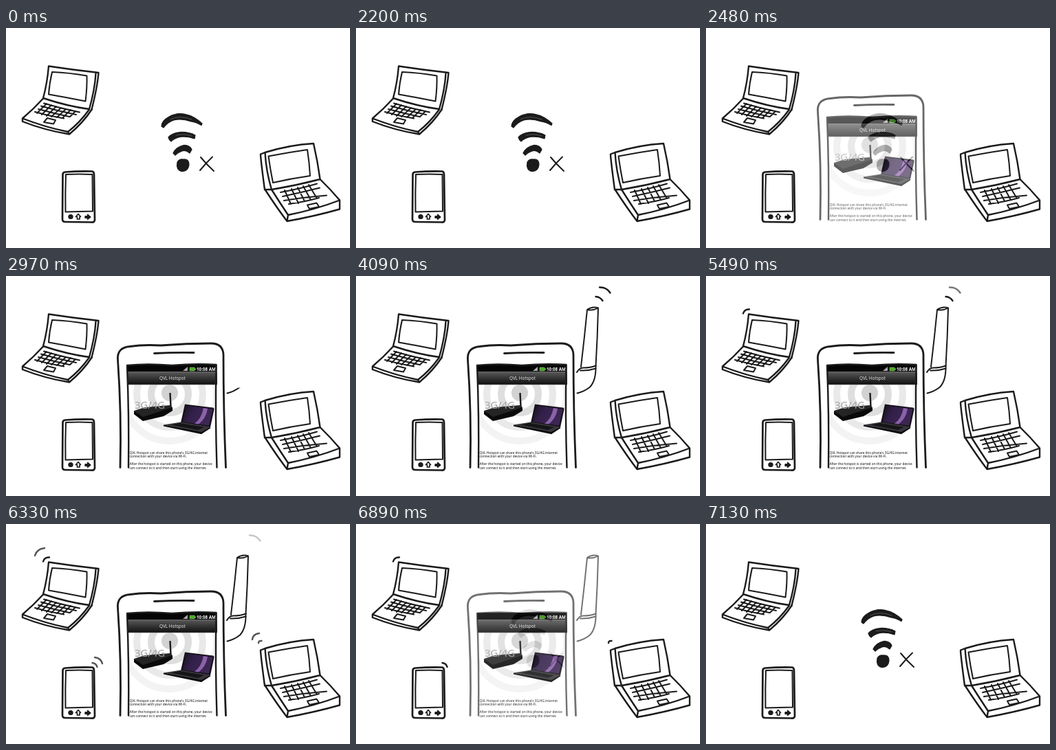
An HTML page that plays this animation: 500 px wide and 320 px high, repeating every 7.21 s.

```html
<!DOCTYPE html>
<html lang="en">
<head>
<meta charset="utf-8">
<title>Phone hotspot</title>
<style>
html, body { margin: 0; width: 100%; height: 100%; overflow: hidden; background: #fff; }
svg { display: block; width: 500px; height: 320px; }
text { font-family: "Noto Sans", "Open Sans", sans-serif; stroke: none; }
.ink { fill: none; stroke: #1b1b1b; stroke-width: 2.4; stroke-linecap: round; stroke-linejoin: round; }
.thin { stroke-width: 2; }
.solid { fill: #1b1b1b; }
.copy { font-size: 4.75px; fill: #111; }

/* One loop is 7210 ms; most changes advance in 70 ms steps. */
.scene, .outline, .echo, .wipe, .wave { animation: 7.21s linear infinite; }
.scene { animation-name: scene; }
.outline { animation-name: outline; }
.echo { animation-name: echo; animation-timing-function: step-end; }
.wipe { animation-name: wipe; }
.mast-in { animation-name: mast-in; }
.mast-out { animation-name: mast-out; }
.left-in { animation-name: left-in; }
.near { animation-name: near; }
.far { animation-name: far; }

@keyframes scene {
  0% { opacity: 0; }
  30.51% { opacity: 0; animation-timing-function: steps(7, jump-none); }
  37.3% { opacity: 1; animation-timing-function: step-end; }
  95.55% { opacity: .88; animation-timing-function: step-end; }
  96.66% { opacity: .6; animation-timing-function: step-end; }
  97.77% { opacity: .25; animation-timing-function: step-end; }
  98.88%, 100% { opacity: 0; }
}
@keyframes outline {
  0% { opacity: 1; animation-timing-function: step-end; }
  95.55%, 100% { opacity: .7; }
}
@keyframes echo {
  0% { opacity: 1; }
  96.66% { opacity: .5; }
  97.77%, 100% { opacity: 0; }
}
@keyframes wipe {
  0% { transform: translateY(134px); }
  41.19% { transform: translateY(134px); animation-timing-function: steps(10, start); }
  50.9%, 100% { transform: none; }
}
@keyframes mast-in {
  0% { opacity: 0; }
  52.84% { opacity: 0; animation-timing-function: steps(4, start); }
  56.72% { opacity: 1; }
  63.52% { opacity: 1; animation-timing-function: steps(4, start); }
  67.4% { opacity: 0; }
  74.2% { opacity: 0; animation-timing-function: steps(2, start); }
  76.14% { opacity: 1; }
  83.91% { opacity: 1; animation-timing-function: steps(4, start); }
  87.79%, 100% { opacity: 0; }
}
@keyframes mast-out {
  0% { opacity: 0; }
  53.81% { opacity: 0; animation-timing-function: steps(4, start); }
  57.69% { opacity: 1; }
  65.46% { opacity: 1; animation-timing-function: steps(4, start); }
  69.34% { opacity: 0; }
  74.2% { opacity: 0; animation-timing-function: steps(5, start); }
  79.05% { opacity: 1; }
  85.85% { opacity: 1; animation-timing-function: steps(4, start); }
  89.73%, 100% { opacity: 0; }
}
@keyframes left-in {
  0% { opacity: 0; }
  63.52% { opacity: 0; animation-timing-function: steps(4, start); }
  67.4% { opacity: 1; }
  77.11% { opacity: 1; animation-timing-function: steps(4, start); }
  80.99% { opacity: 0; }
  83.91% { opacity: 0; animation-timing-function: steps(4, start); }
  87.79%, 100% { opacity: 1; }
}
@keyframes near {
  0% { opacity: 0; }
  63.52% { opacity: 0; animation-timing-function: steps(4, start); }
  67.4% { opacity: 1; }
  74.2% { opacity: 1; animation-timing-function: steps(2, start); }
  76.14% { opacity: 0; }
  85.85% { opacity: 0; animation-timing-function: steps(4, start); }
  89.73%, 100% { opacity: 1; }
}
@keyframes far {
  0% { opacity: 0; }
  65.46% { opacity: 0; animation-timing-function: steps(4, start); }
  69.34% { opacity: 1; }
  74.2% { opacity: 1; animation-timing-function: steps(2, start); }
  76.14% { opacity: 0; }
  85.85% { opacity: 0; animation-timing-function: steps(4, start); }
  89.73% { opacity: 1; animation-timing-function: steps(4, start); }
  93.61%, 100% { opacity: 0; }
}
</style>
</head>
<body>
<svg viewBox="0 0 500 320">
  <defs>
    <linearGradient id="bar" x2="0" y2="1">
      <stop stop-color="#5c5c5c"/><stop offset=".5" stop-color="#343434"/><stop offset="1" stop-color="#101010"/>
    </linearGradient>
    <linearGradient id="lid" x2="1" y2=".4">
      <stop stop-color="#151119"/><stop offset=".4" stop-color="#33204a"/><stop offset="1" stop-color="#3d2754"/>
    </linearGradient>
    <clipPath id="page"><rect x="178" y="158" width="129" height="125"/></clipPath>
    <clipPath id="grow"><rect class="wipe" x="318" y="42" width="40" height="134"/></clipPath>
  </defs>
  <rect width="500" height="320" fill="#fff"/>

  <!-- left laptop -->
  <g class="ink">
    <path d="M54 102Q60 80 62 55.500Q98 61 134.500 65Q133 85 124.500 118.500M54 102Q90 114 121 118Q129 90 130.500 66.500"/>
    <path class="thin" d="M67 64Q92 65 117.500 69.500Q118 87 115.500 106.500Q88 101 62 96.500Q63 81 67 64Z"/>
    <path d="M54 102.500Q40 118 24 131.500Q56 144 90 151Q107 138 121 118.500M24 132V136Q57 149 92 154.500Q112 138 125 118M90 151L92 154.500"/>
    <path class="thin" d="M55 109.500Q80 117 107 122.500M51 113.500Q76 121 102 126M47 118Q69 124 92 129M42 122Q62 128 84 131.500M59 110L45 124M66 112L52 126M73 114L59 128M80 116L66 129M87 118L74 130M94 119L82 131M101 121L93 129"/>
    <path class="thin" d="M60 131L72 134L69 139.500L55 137Z"/>
  </g>

  <!-- small phone -->
  <g class="ink">
    <path d="M86 209.500Q106 208 125 208.500Q128 209 128 213L129 279Q129 283 124 282.500L86 282Q82 282 82 278L82.500 213Q82.500 210 86 209.500Z" stroke-width="2.700"/>
    <path class="thin" d="M87 213Q106 212 125.500 213L126 266.500Q105 267 86.500 267.500Q86 240 87 213Z"/>
    <ellipse class="solid" cx="94" cy="274.500" rx="3" ry="2.800" stroke-width="1.400"/>
    <path d="M101.500 274.500L105 270.500L108.500 274.500H107V278H103.500V274.500Z" stroke-width="1.700"/>
    <path class="solid" d="M115 273.500H118.500V271L123 275L118.500 278.500V276.500H115Z" stroke-width="1.200"/>
  </g>

  <!-- right laptop -->
  <g class="ink">
    <path d="M376.500 181Q412 170 447 168Q453 194 456.500 220Q422 229 386 235Q378 208 376.500 181ZM376.500 181L370 183.500Q370 190 376 235"/>
    <path d="M381.500 186.500Q410 181 438 177Q441 196 442 215Q414 219 388 225Q384 205 381.500 186.500Z" class="thin"/>
    <path d="M386 235H376.500Q394 262 408.500 281Q448 274 485 263.500V250.500Q472 235 456.500 220M386 235Q398 254 410 272Q450 264 485 250.500M410 272L408.500 281"/>
    <path class="thin" d="M399 239Q427 234 452 226.500M402 245Q430 239 456 232.500M404 251Q434 246 466 243.500M411 256Q434 253 455 247M405 236L414 256M415 234L425 255M424 232L434 252M432 230L443 250M440 228L452 248"/>
    <path class="thin" d="M438 257.500L451.500 254.500L455 260L441 263Z"/>
  </g>

  <!-- lost wireless signal -->
  <g class="ink">
    <g class="solid" stroke-width="1.200">
      <path d="M226 143Q226 135 237 129Q247 123 259 125Q274 128 285 139L284 141.500Q276 137 269 136Q255 131 244 134Q235 137 229 145Z"/>
      <path d="M236 159Q242 152 253 151.500Q266 151 275 156L274 161Q266 158 257 158Q246 159 240 165Q237 163 236 159Z"/>
      <path d="M243 182Q247 173 258 170.500Q267 170 270 177L267 182Q261 177 256 179Q250 181 246 185Z"/>
      <path d="M249 195Q252 190 258 191Q266 190 266 199Q265 208 257 208.500Q250 209 248.500 201Z"/>
    </g>
    <path d="M239 133Q252 126 270 133M247 156Q258 153 270 157" stroke="#777" stroke-width=".6"/>
    <path class="thin" d="M283 188Q292 199 302 208M300 187.500Q291 196 282 207"/>
  </g>

  <!-- hotspot phone, antenna and its waves -->
  <g class="scene">
    <rect x="160" y="96" width="162" height="188" fill="#fff"/>
    <g clip-path="url(#page)">
      <g fill="none" stroke="#e9e9e9" stroke-width="10">
        <circle cx="238" cy="172" r="48"/><circle cx="238" cy="172" r="68" stroke="#f3f3f3"/>
        <circle cx="238" cy="172" r="27" stroke="#dedede"/>
      </g>
      <circle cx="238" cy="170" r="12" fill="#d2d2d2"/>
      <path d="M186 196L202 191L238 188L242 191L229 203L199 207Z" fill="#242424"/>
      <path d="M186 196L199 205L242 191V196L229 204L199 211L186 201Z" fill="#0a0a0a"/>
      <path d="M239.500 190L238.500 170" stroke="#1b1b1b" stroke-width="2.400"/>
      <text x="187" y="193" font-size="14.800" fill="#a2a2a2">3G/4G</text>
      <path d="M260 186.500L301 191.500Q303 192 302.500 194L297 220L254 213.500Z" fill="#151219"/>
      <path d="M262 188.500L300.500 193.500L295 217.500L257 212Z" fill="url(#lid)"/>
      <path d="M274 214.500Q284 208 287 192L293 193Q291 207 280 215.500Z" fill="#8a62a8"/>
      <path d="M254 212.500L297 219.500L284 228L229 216.500Z" fill="#37363a"/>
      <path d="M253 214L288 220L279 224L240 216.500Z" fill="#151517"/>
      <path d="M229 216.500L284 227L297 219.500V221.500L284 230L229 218.500Z" fill="#09090a"/>
      <g class="copy">
        <text x="179.500" y="258.600">QVL Hotspot can share this phone's 3G/4G internet</text>
        <text x="179.500" y="263.900">connection with your device via Wi-Fi.</text>
        <text x="179.500" y="275.400">After the hotspot is started on this phone, your device</text>
        <text x="179.500" y="280.800">can connect to it and then start using the internet.</text>
      </g>
    </g>
    <path d="M176 129H306.500V139H176Z" fill="#050505"/>
    <path d="M176 139H307V158H177Z" fill="url(#bar)"/>
    <path d="M176.500 139.500H307M177 158H307" stroke="#777" stroke-width=".6"/>
    <path d="M257 138L264 132V138Z" fill="#aaa"/>
    <path d="M267 133H274V134.500H275.500V136.500H274V138H267Z" fill="#4ca829" stroke="#94c77d" stroke-width=".5"/>
    <text x="277" y="137.900" font-size="6.250" font-weight="700" fill="#fff">10:08 AM</text>
    <text x="242" y="150.500" font-size="6.400" text-anchor="middle" fill="#e2e2e2">QVL Hotspot</text>
    <g class="ink outline">
      <path d="M166 278.500Q168 200 162.500 122Q161 104 180 102.500Q200 99.500 225 101Q262 98 298 98Q315 98 316 114Q316 195 319.500 278.500" stroke-width="2.800"/>
      <path d="M178 278.500Q179 205 176 130Q206 127 241 130Q275 127 305.500 129Q304 203 306.500 278.500"/>
      <path d="M215.500 112.500Q244 111 273 111.500" stroke-width="2.800"/>
      <g clip-path="url(#grow)">
        <path class="thin" d="M327 132Q332 90 336 49Q344 43.500 352 46.500Q351 90 348.500 131M336 49Q344 51 352 46.500"/>
        <path class="thin" d="M321 140Q325 133 331 133.500Q341 133.500 348.500 130.500M326 137.500Q338 138 348.500 134.500"/>
        <path class="thin" d="M348.500 131Q349 152 340 161.500Q332 168 321.500 170.500"/>
      </g>
    </g>
    <g class="ink">
      <path class="wave mast-in" d="M348.500 30Q355 30.500 358.500 36"/>
      <path class="wave mast-out" d="M354 16.500Q364 16 369.500 24.500"/>
    </g>
  </g>

  <!-- waves at the devices -->
  <g class="ink echo">
    <path class="wave left-in" d="M54 54.500Q56 48 63 48.500"/>
    <path class="wave near" d="M125.500 202Q131 202.500 132.500 208"/>
    <path class="wave near" d="M367 173Q367 169.500 371.500 170"/>
    <g class="wave far">
      <path d="M42 46Q45 36 56 35"/>
      <path d="M129 194Q138 195 140 203"/>
      <path d="M358 168Q359 160 368 159"/>
    </g>
  </g>
</svg>
</body>
</html>
```
